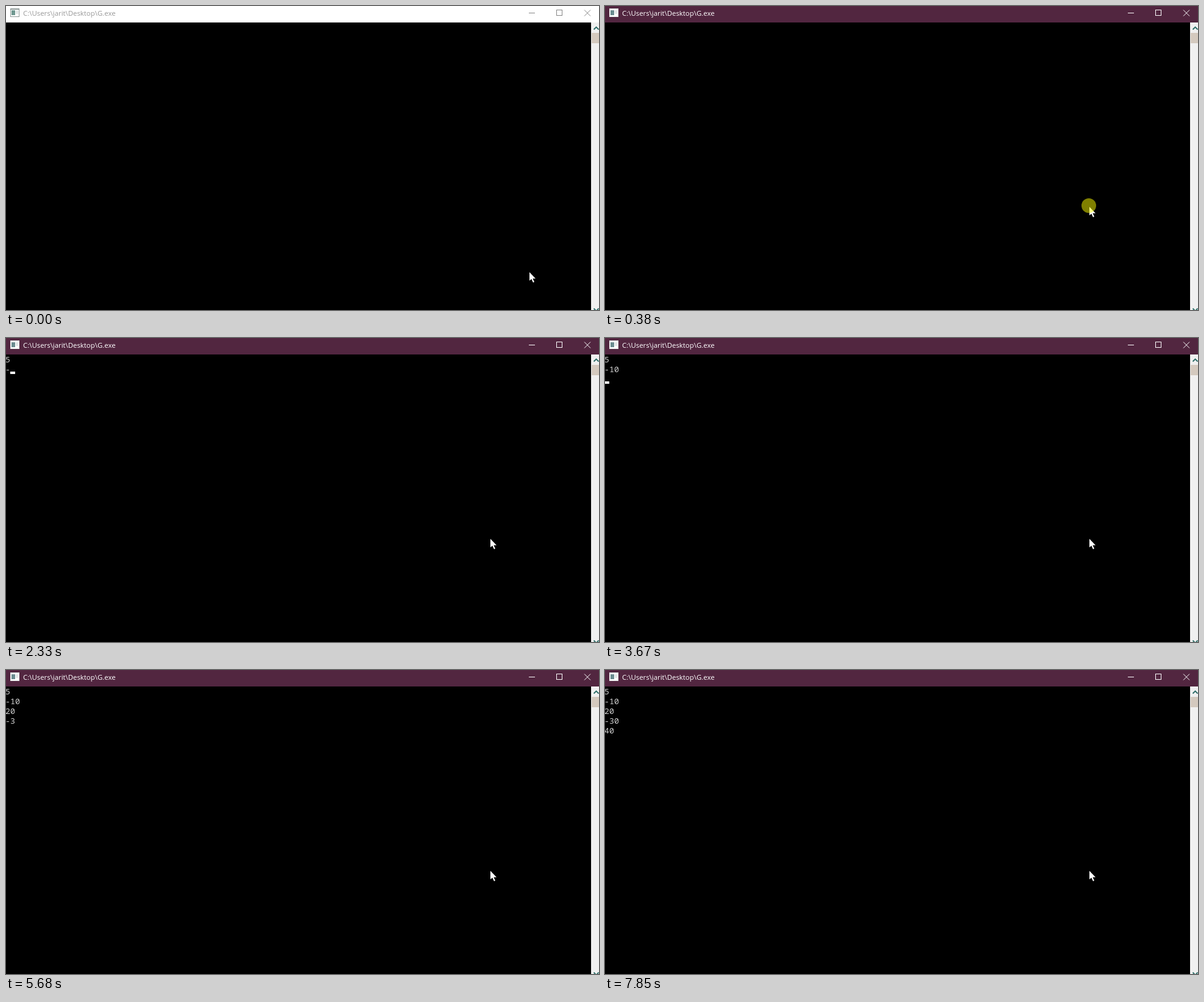
Animation of 972x498 px, one loop 8 s. Source, as an HTML page:

```html
<!DOCTYPE html>
<html lang="en">
<head>
<meta charset="utf-8">
<title>Console</title>
<style>
  html, body { margin: 0; width: 100%; height: 100%; overflow: hidden; background: #000; }
  svg { display: block; width: 972px; height: 498px; }
  #bar { --bg: #fff; --text: #999; --line: #868686; --frame: #8c9896; --pane: #6f9890; }
  #bar.active { --bg: #522640; --text: #fff; --line: #fff; --frame: #e4e8e8; --pane: #6b8c90; }
  #bar text { font: 11.4px "Open Sans", "Noto Sans", sans-serif; fill: var(--text); }
  #buttons { fill: none; stroke: var(--line); }
  #lines text { font: 13.333px "Noto Sans Mono", monospace; fill: #ccc; white-space: pre; }
</style>
</head>
<body>
<svg viewBox="0 0 972 498">
  <rect width="972" height="498"/>
  <g id="bar">
    <rect width="972" height="27" fill="var(--bg)"/>
    <rect x="7" y="4" width="15" height="14" fill="var(--frame)"/>
    <rect x="8" y="6" width="13" height="11" fill="#fff"/>
    <rect x="9" y="7" width="6" height="8" fill="var(--pane)"/>
    <rect x="16" y="7" width="4" height="6" fill="#e0e6e6"/>
    <text x="28" y="16">C:\Users\jarit\Desktop\G.exe</text>
    <g id="buttons">
      <path d="M857 11.5h10M902.5 6.5h9v9h-9z" shape-rendering="crispEdges"/>
      <path d="M948 6.5l10 10M958 6.5l-10 10"/>
    </g>
  </g>
  <g id="scroll">
    <rect x="959" y="27" width="13" height="471" fill="#f0f0f0"/>
    <rect x="960" y="44" width="12" height="17" fill="#d4c9be"/>
    <path d="M963.5 38.5l4 -4 4 4M963.5 495.5l4 4 4 -4" fill="none" stroke="#2a6b66" stroke-width="1.8"/>
  </g>
  <g id="lines"></g>
  <rect id="caret" width="8" height="4" fill="#fff"/>
  <path id="pointer" d="M0 0V14L3.2 11.2 6 17 8 16 5.4 10.4H10Z" fill="#fff"/>
  <circle id="click" cx="793" cy="327" r="12" fill="#ff0" fill-opacity=".5"/>
</svg>
<script>
const LOOP = 8000, CELL = 8, ROW = 16;
const $ = id => document.getElementById(id);

// Pointer steps: time, x, y
const path = [[0, 858, 436], [70, 846, 416], [150, 818, 370], [230, 799, 338], [300, 794, 329]];

// Key presses show the caret; an empty key is a blink that toggles it
const keys = [
  [530, ''], [930, ''], [1460, ''], [1630, '5'], [2010, ''], [2170, '\n'],
  [2330, '-'], [2560, ''], [2960, '1'], [3100, ''], [3260, '0'], [3580, ''], [3670, '\n'],
  [4050, '2'], [4140, ''], [4360, '0'], [4680, ''], [4920, '\n'],
  [5220, '-'], [5680, '3'], [5680, ''], [6000, '0'], [6230, ''], [6460, '\n'],
  [6780, ''], [7160, '4'], [7310, ''], [7580, '0'], [7850, '']
];

const rows = Array.from({ length: 5 }, (_, i) => {
  const row = document.createElementNS('http://www.w3.org/2000/svg', 'text');
  row.setAttribute('x', -1);
  row.setAttribute('y', 40 + i * ROW);
  return $('lines').appendChild(row);
});

const show = (el, on) => el.setAttribute('visibility', on ? 'visible' : 'hidden');

function typed(t) {
  let text = '', caret = false;
  for (const [at, key] of keys) {
    if (at > t) break;
    text += key;
    caret = key ? true : !caret;
  }
  return { lines: text.split('\n'), caret };
}

function draw(t) {
  const [, x, y] = path.findLast(step => step[0] <= t);
  $('pointer').setAttribute('transform', `translate(${x} ${y})`);
  $('bar').classList.toggle('active', t >= 380);
  show($('click'), t >= 380 && t < 530);

  const { lines, caret } = typed(t);
  rows.forEach((row, i) => { row.textContent = lines[i] || ''; });
  const last = lines.length - 1;
  $('caret').setAttribute('x', lines[last].length * CELL - 1);
  $('caret').setAttribute('y', 39 + last * ROW);
  show($('caret'), caret);
}

const start = performance.now();
function tick() {
  draw((performance.now() - start) % LOOP);
  requestAnimationFrame(tick);
}
tick();
</script>
</body>
</html>
```
